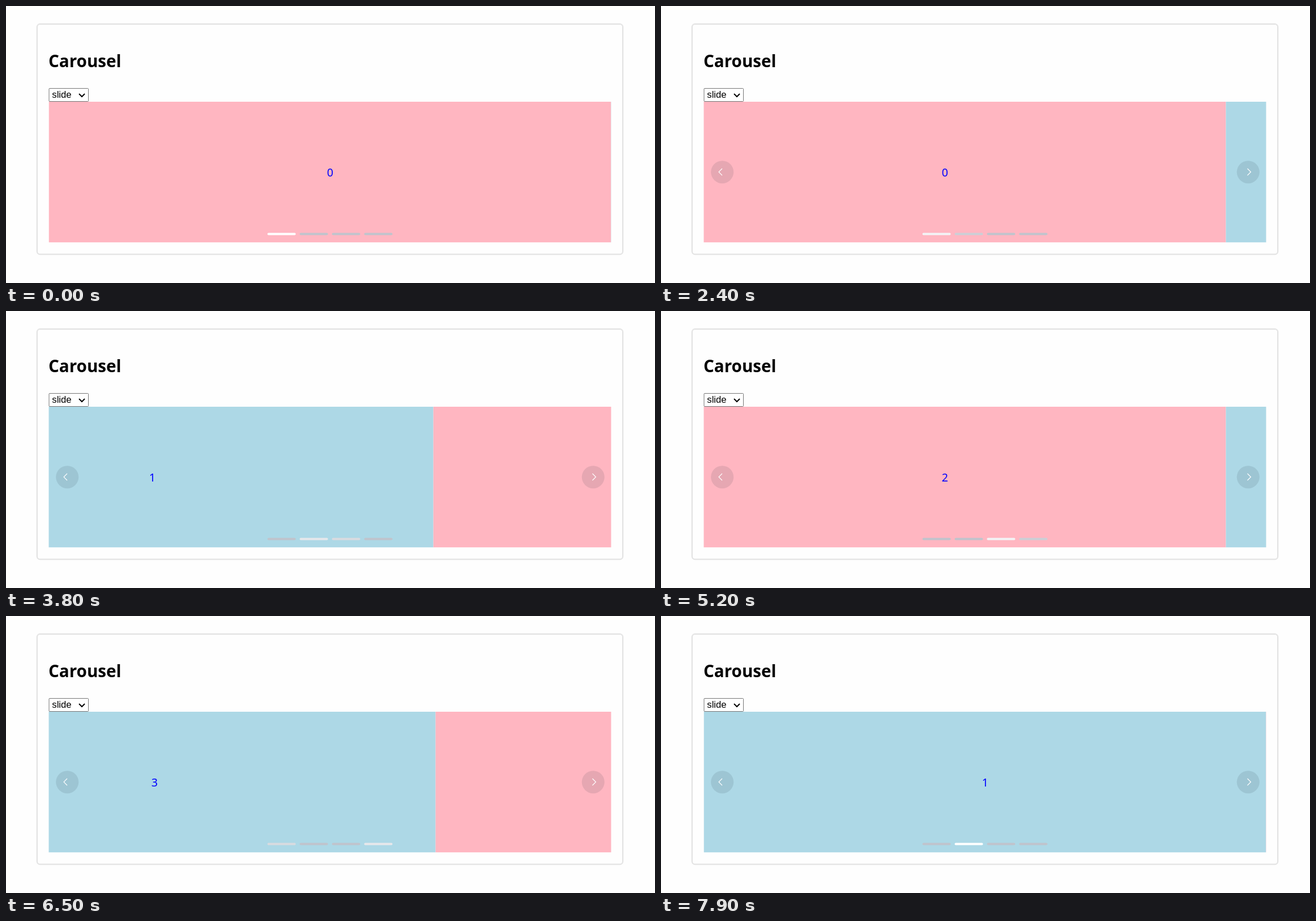
Animation, 1146 px wide and 489 px high, one loop 8 s. Source, as an HTML page:

```html
<!DOCTYPE html>
<html lang="en">
<head>
<meta charset="utf-8">
<title>Carousel</title>
<style>
  html, body { margin: 0; width: 100%; height: 100%; overflow: hidden; background: #fefefe; }
  svg { display: block; }
  .card { fill: none; stroke: #f6f6f6; stroke-width: 4; }
  .card.line { fill: #fefefe; stroke: #e3e3e3; stroke-width: 2; }
  .title { font: 700 29.6px "Noto Sans", "Open Sans", sans-serif; }
  .option { font: 16.67px "Liberation Sans", Arial, sans-serif; }
  .digit { font: 19.6px "Noto Sans", "Open Sans", sans-serif; fill: #00f; text-anchor: middle; }
  .arrow circle { fill: rgba(31, 45, 61, .11); }
  .arrow path { fill: none; stroke: #fff; stroke-width: 1.1; }
</style>
</head>
<body>
<svg width="1146" height="489" viewBox="0 0 1146 489">
  <clipPath id="view"><rect x="75.5" y="169" width="993" height="248.3"/></clipPath>
  <rect class="card" x="55" y="32" width="1034" height="406.3" rx="6"/>
  <rect class="card line" x="55" y="32" width="1034" height="406.3" rx="5"/>
  <text class="title" x="75" y="108">Carousel</text>
  <rect x="76" y="145.5" width="69.5" height="23" rx="1" fill="#fff" stroke="#767676"/>
  <text class="option" x="81.3" y="162">slide</text>
  <path d="M129 155l5 5 5-5" fill="none" stroke="#000" stroke-width="2"/>
  <g clip-path="url(#view)">
    <g class="slide"><rect x="75.5" y="169" width="993" height="249"/><text class="digit" x="572.3" y="301"/></g>
    <g class="slide"><rect x="75.5" y="169" width="993" height="249"/><text class="digit" x="572.3" y="301"/></g>
  </g>
  <g id="dots"></g>
  <g class="arrow"><circle cx="108.2" cy="293.2" r="20"/><path d="M108 287l-6 6 6 6"/></g>
  <g class="arrow"><circle cx="1036.8" cy="293.2" r="20"/><path d="M1035.5 287l6 6-6 6"/></g>
</svg>
<script>
const LOOP = 8000, STEP = 100, MOVE = 400, WIDTH = 993, COUNT = 4;
const moveStarts = [2325, 3644, 5125, 6345, 7497];
const colors = ['#ffb6c1', '#add8e6'];
const slides = [...document.querySelectorAll('.slide')];
const arrows = [...document.querySelectorAll('.arrow')];
const clamp = v => Math.min(1, Math.max(0, v));

const dots = Array.from({ length: COUNT }, (_, i) => {
  const dot = document.createElementNS('http://www.w3.org/2000/svg', 'rect');
  const box = { x: 461.6 + i * 56.95, y: 400.4, width: 50, height: 4, rx: 2 };
  for (const key in box) dot.setAttribute(key, box[key]);
  return document.getElementById('dots').appendChild(dot);
});

// Solves a cubic Bezier timing curve by bisection.
function bezier(x1, y1, x2, y2, x) {
  const at = (a, b, s) => 3 * (1 - s) ** 2 * s * a + 3 * (1 - s) * s * s * b + s ** 3;
  let low = 0, high = 1;
  for (let i = 0; i < 24; i++) {
    const mid = (low + high) / 2;
    if (at(x1, x2, mid) < x) low = mid; else high = mid;
  }
  return at(y1, y2, (low + high) / 2);
}
const ease = p => p <= 0 ? 0 : p >= 1 ? 1 : bezier(.25, .1, .25, 1, p);
const easeInOut = p => p <= 0 ? 0 : p >= 1 ? 1 : bezier(.42, 0, .58, 1, p);

function draw(time) {
  const t = Math.floor(time % LOOP / STEP) * STEP;

  const progress = moveStarts.map(start => clamp((t - start) / MOVE));
  const done = progress.filter(p => p === 1).length;
  const moving = progress[done] || 0;
  slides.forEach((slide, i) => {
    const index = done + i;
    slide.setAttribute('transform', `translate(${(i - easeInOut(moving)) * WIDTH})`);
    slide.firstChild.setAttribute('fill', colors[index % 2]);
    slide.lastChild.textContent = index % COUNT;
  });

  dots.forEach((dot, i) => {
    const lit = i === done % COUNT ? 1 - moving : i === (done + 1) % COUNT ? moving : 0;
    const mix = [192, 196, 204].map(c => Math.round(c + (255 - c) * lit));
    dot.setAttribute('fill', `rgb(${mix})`);
  });

  const shown = t < 600 ? 0 : ease((t - 450) / 300);
  arrows.forEach((arrow, i) => {
    arrow.setAttribute('opacity', shown);
    arrow.setAttribute('transform', `translate(${(i ? 10 : -10) * (1 - shown)})`);
  });
}

const begin = performance.now();
function tick() {
  draw(performance.now() - begin);
  requestAnimationFrame(tick);
}
tick();
</script>
</body>
</html>
```
